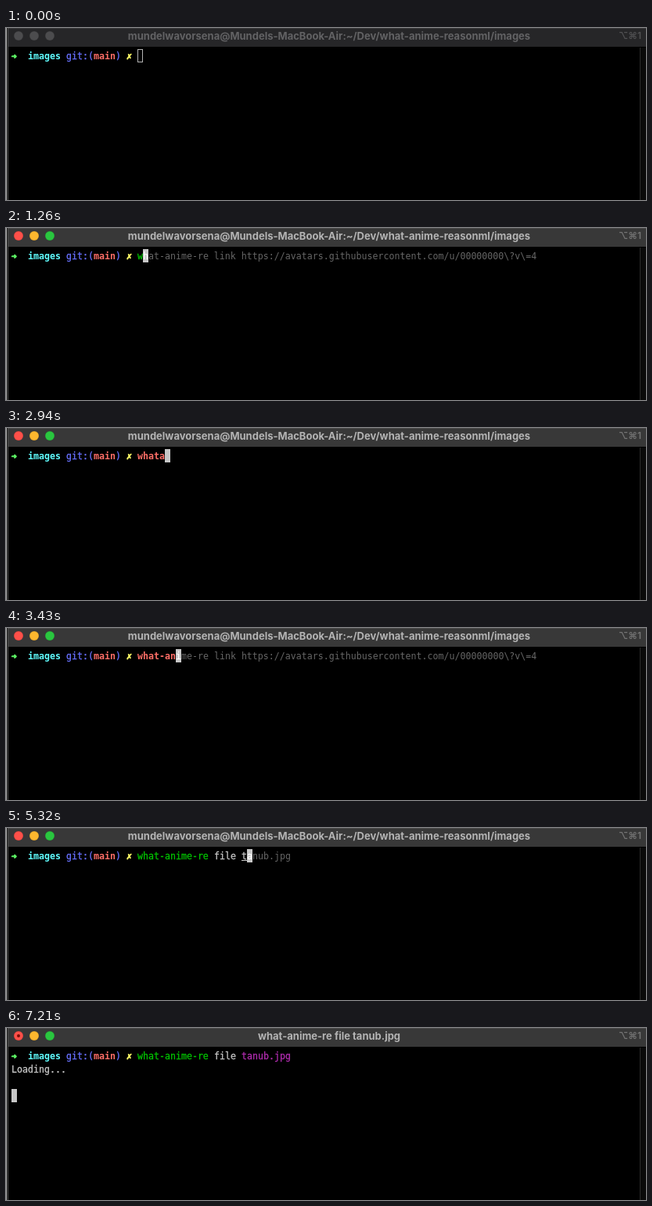
Animation, 818 px wide and 220 px high, one loop 8000 ms. Source, as an HTML page:

```html
<!DOCTYPE html>
<html lang="en">
<head>
<meta charset="utf-8">
<title>Terminal</title>
<style>
  html, body { margin: 0; width: 100%; height: 100%; overflow: hidden; background: #000; }
  #stage { position: relative; width: 818px; height: 220px; overflow: hidden; background: #000; }
  #stage div, #stage span, #stage i { position: absolute; box-sizing: border-box; }

  #bar { left: 0; top: 0; width: 818px; height: 24px; background: #383838; border-top: 1px solid #4a4a4a; }
  #title { left: 0; top: 0; width: 826px; text-align: center; white-space: pre;
    font: 700 13px/20px Inter, sans-serif; color: #b4b4b4; }
  #hotkey { left: 783px; top: 1px; white-space: pre; font: 600 12px/18px Inter, "DejaVu Sans", sans-serif; color: #737373; }
  .light { top: 4px; width: 12px; height: 12px; border-radius: 50%; box-shadow: inset 0 0 0 .5px #0003; }
  #close { left: 10px; background: #fe5049; }
  #mini { left: 30px; background: #fdb72e; }
  #zoom { left: 50px; background: #2ac63f; }
  #dot { left: 4px; top: 4px; width: 4px; height: 4px; border-radius: 50%; background: #7a0d08; }
  .idle #bar { background: #262628; border-color: #39393b; }
  .idle #title { color: #626264; }
  .idle #hotkey { color: #505052; }
  #stage.idle .light { background: #4c4c4e; }

  #edge { left: 0; top: 0; width: 3px; height: 220px; background: #161616;
    border: solid; border-width: 0 1px; border-color: #000 #4c4c4c #000 #b4b4b4; }
  #track { left: 810px; top: 25px; width: 8px; height: 195px; background: #0a0a0a; border-left: 1px solid #2b2b2b; }

  #text { left: 7px; top: 28px; }
  #text span, #cursor { white-space: pre; font: 11.627px/17px "DejaVu Sans Mono", monospace; color: #c7c7c7;
    -webkit-text-stroke: .3px; }
  #text .bold { font-weight: 700; -webkit-text-stroke: 0; }
  #text .heavy { font-weight: 700; -webkit-text-stroke: .8px; }
  #text .lime { color: #5ff967; }
  #text .cyan { color: #60fdff; }
  #text .blue { color: #6871ff; }
  #text .red { color: #ff6e67; }
  #text .yellow { color: #fffc67; }
  #text .green { color: #00c200; }
  #text .magenta { color: #b02cae; }
  #text .hint { color: #666; -webkit-text-stroke: 0; }
  #text .path { text-decoration: underline; }
  #stage #cursor { width: 7px; height: 17px; line-height: 19px; background: #c7c7c7; color: #fff; }
  #stage.idle #cursor { background: none; border: 1px solid #b4b4b4; }
</style>
</head>
<body>
<div id="stage">
  <div id="bar"></div>
  <div id="title"></div>
  <div id="hotkey">⌥⌘1</div>
  <div id="edge"></div>
  <div id="track"></div>
  <div id="close" class="light"><i id="dot"></i></div>
  <div id="mini" class="light"></div>
  <div id="zoom" class="light"></div>
  <div id="text"></div>
  <div id="cursor"></div>
</div>
<script>
const LOOP = 8000, CELL_W = 7, CELL_H = 17, LEFT = 7, TOP = 27, INPUT_COL = 23;
const FOCUS = 700, ENTER = 6510, OUTPUT = 6580, BUSY = 7140;

const COMMAND = "what-anime-re";
const FILE = "tanub.jpg";
const RUN = `${COMMAND} file ${FILE}`;
const HISTORY = [
  String.raw`${COMMAND} link https://avatars.githubusercontent.com/u/00000000\?v\=4`,
  RUN
];
const HOME_TITLE = "mundelwavorsena@Mundels-MacBook-Air:~/Dev/what-anime-reasonml/images";

// [time, text on the command line]
const TYPING = [
  [0, ""], [1260, "w"], [1540, "wh"], [1610, "wha"], [1680, "what"],
  [2170, "whata"], [2310, "whatan"], [2450, "whatani"],
  [2800, "whatan"], [2940, "whata"], [3080, "what"],
  [3220, "what-"], [3360, "what-a"], [3430, "what-an"],
  [3570, "what-ani"], [3640, "what-anime"], [3850, "what-anime-"],
  [4060, "what-anime-r"], [4130, COMMAND], [4270, COMMAND + " "],
  [4480, COMMAND + " fi"], [4620, COMMAND + " fil"], [4690, COMMAND + " file"],
  [4830, COMMAND + " file "], [5320, COMMAND + " file " + FILE[0]], [5670, RUN + " "]
];

const PROMPT = [
  [0, "➜", "heavy lime"], [3, "images", "bold cyan"], [10, "git:(", "blue"],
  [15, "main", "bold red"], [19, ")", "blue"], [21, "✗", "heavy yellow"]
];

const $ = id => document.getElementById(id);

function addText(col, text, style = "", row = 0) {
  if (!text) return;
  const span = document.createElement("span");
  span.className = style;
  span.textContent = text;
  span.style.left = col * CELL_W + "px";
  span.style.top = row * CELL_H + "px";
  $("text").append(span);
}

function placeCursor(col, row, char = "") {
  const cursor = $("cursor");
  cursor.style.left = LEFT + col * CELL_W + "px";
  cursor.style.top = TOP + row * CELL_H + "px";
  cursor.textContent = char;
}

function drawInput(typed) {
  const [name, sub = "", arg = ""] = typed.split(" ");
  const known = name === "w" || name === COMMAND;
  const subCol = INPUT_COL + name.length + 1;
  addText(INPUT_COL, name, known ? "green" : "bold red");
  addText(subCol, sub);
  addText(subCol + sub.length + 1, arg, arg === FILE ? "magenta" : "path");
}

function draw(t) {
  const typed = TYPING.findLast(step => step[0] <= t)[1];
  const end = INPUT_COL + typed.length;
  $("stage").className = t < FOCUS ? "idle" : "";
  $("title").textContent = t < ENTER ? HOME_TITLE : RUN;
  $("dot").style.display = t < BUSY ? "none" : "block";
  $("text").replaceChildren();
  for (const part of PROMPT) addText(...part);
  drawInput(typed);

  if (t < ENTER) {
    const match = typed && HISTORY.find(line => line.startsWith(typed));
    const rest = match ? match.slice(typed.length) : "";
    addText(end + 1, rest.slice(1), "hint");
    placeCursor(end, 0, rest[0]);
  } else if (t < OUTPUT) {
    placeCursor(0, 1);
  } else {
    addText(0, "Loading...", "", 1);
    placeCursor(0, 3);
  }
}

const cuts = [...TYPING.map(step => step[0]), FOCUS, ENTER, OUTPUT, BUSY].sort((a, b) => a - b);
const start = performance.now();
let shown = -1;

function tick() {
  const t = Math.max(0, performance.now() - start) % LOOP;
  const cut = cuts.findLast(c => c <= t);
  if (cut !== shown) draw(shown = cut);
  requestAnimationFrame(tick);
}
tick();
</script>
</body>
</html>
```
